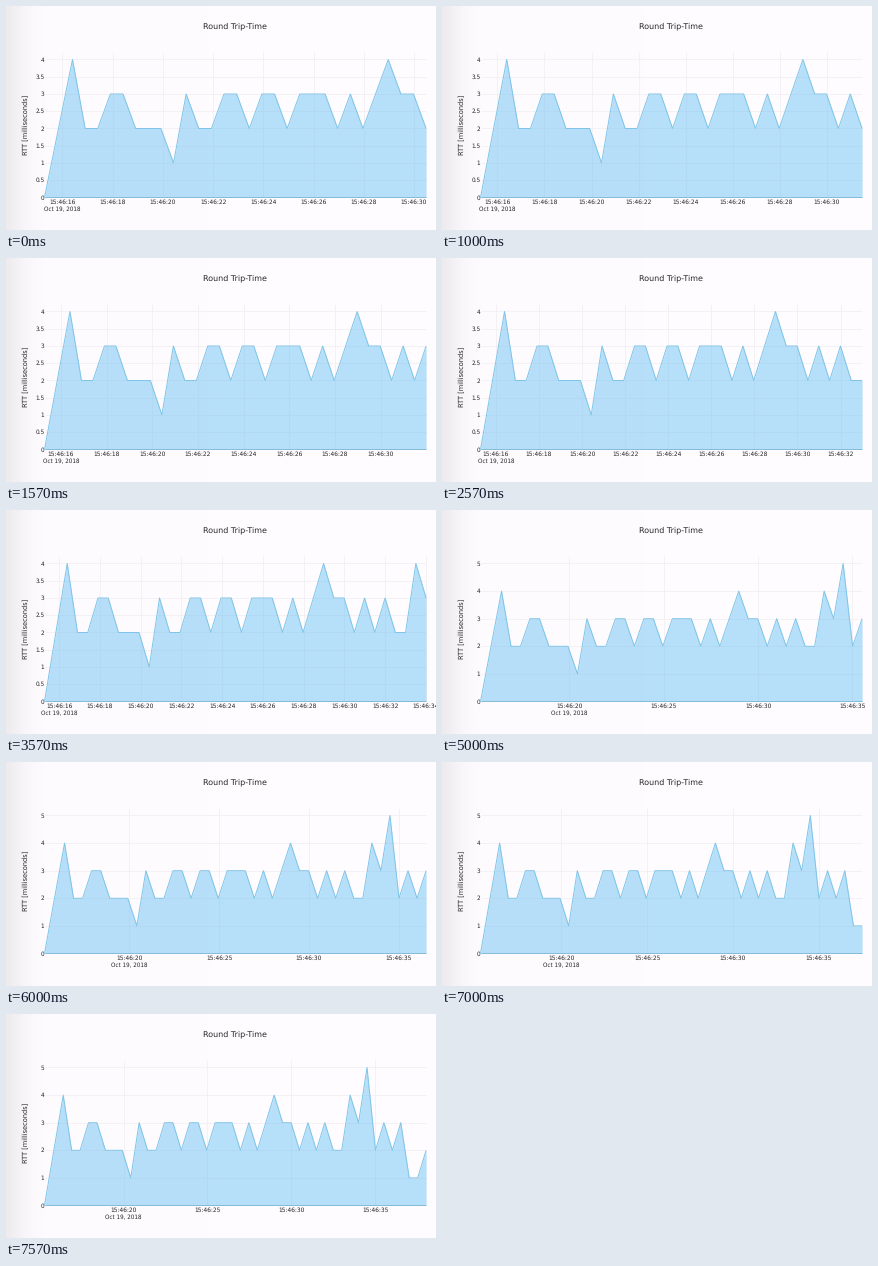
Recreate the animation shown at these times as a matplotlib script. Size 430x224 px, loop 8 s.

```python
import math

import numpy as np
import matplotlib.pyplot as plt
from matplotlib.animation import FuncAnimation

W, H, DPI = 430, 224, 100
LEFT, RIGHT, TOP, BASE, PEAK = 38, 419.6, 46, 191, 53
INTERVAL, LOOP = 40, 8000

plt.rcParams["font.family"] = "DejaVu Sans"
plt.rcParams["text.hinting"] = "none"

# Round-trip times in ms; the first sample precedes the regular half-second polling.
RTT = [int(c) for c in "0" "4223322213" "2233233233" "3232343323" "23224352323112"]
START, FIRST_POLL, STEP = 15.285, 16.4, 0.503
TIMES = [START] + [FIRST_POLL + STEP * i for i in range(len(RTT) - 1)]
INITIAL = 30

INK = "#262626"
GRID = "#f1eff2"
LINE = "#80c5e8"
FILL = "#70c3f5"

fig = plt.figure(figsize=(W / DPI, H / DPI), dpi=DPI)
ax = fig.add_axes([0, 0, 1, 1])
ax.set_axis_off()


def px(size):
    return size * 72 / DPI


def label(x, y, text, size, **style):
    return ax.text(x, y, text, fontsize=px(size), color=INK, **style)


def draw_static():
    x = np.arange(W)[None, :, None]
    paper = np.array([254, 252, 254])
    shade = (paper - 17 * np.exp(-(x / 19) ** 1.5)) / 255
    ax.imshow(shade, extent=(-0.5, W - 0.5, H - 0.5, -0.5), aspect="auto", zorder=0)
    ax.set_xlim(-0.5, W - 0.5)
    ax.set_ylim(H - 0.5, -0.5)
    label(228, 22, "Round Trip-Time", 7.95, ha="center", va="baseline")
    label(19.6, 118.5, "RTT [milliseconds]", 6.6, ha="center", va="center", rotation=90)


def draw_chart(count):
    times, values = np.array(TIMES[:count]), np.array(RTT[:count])
    end, top = times[-1], values.max()
    artists = []

    def to_x(t):
        return LEFT + (t - START) * (RIGHT - LEFT) / (end - START)

    def to_y(v):
        return BASE - v * (BASE - PEAK) / top

    def line(xs, ys, color, width, order):
        artists.extend(ax.plot(xs, ys, color=color, lw=px(width), zorder=order,
                               solid_joinstyle="round", solid_capstyle="butt"))

    x_step = 2 if end - START < 20 else 5
    first = math.ceil(START / x_step) * x_step
    for t in range(first, math.floor(end) + 1, x_step):
        x = to_x(t)
        line([x, x], [TOP, BASE], GRID, 0.8, 1)
        artists.append(label(x, 197.4, f"15:46:{t}", 5.85, ha="center", va="baseline"))
    artists.append(label(to_x(first), 204.5, "Oct 19, 2018", 5.65,
                         ha="center", va="baseline"))

    y_step = 0.5 if top < 5 else 1
    for v in np.arange(0, top + y_step / 2, y_step):
        y = to_y(v)
        if v:
            line([LEFT, RIGHT], [y, y], GRID, 0.8, 1)
        artists.append(label(37.8, y + 2.1, f"{v:g}", 5.8, ha="right", va="baseline"))

    xs, ys = to_x(times), to_y(values)
    artists.append(ax.fill_between(xs, ys, BASE, color=FILL, alpha=0.5, lw=0, zorder=2))
    line([LEFT, RIGHT], [BASE, BASE], "#78b4d2", 0.8, 3)
    line(xs, ys, LINE, 1, 4)
    return artists


draw_static()
chart = []


def update(frame):
    second, rest = divmod(frame * INTERVAL, 1000)
    count = INITIAL + 2 * second + (rest >= 560)
    while chart:
        chart.pop().remove()
    chart.extend(draw_chart(count))
    return chart


anim = FuncAnimation(fig, update, frames=LOOP // INTERVAL, interval=INTERVAL,
                     repeat=True, repeat_delay=0, blit=False)
plt.show()
```
